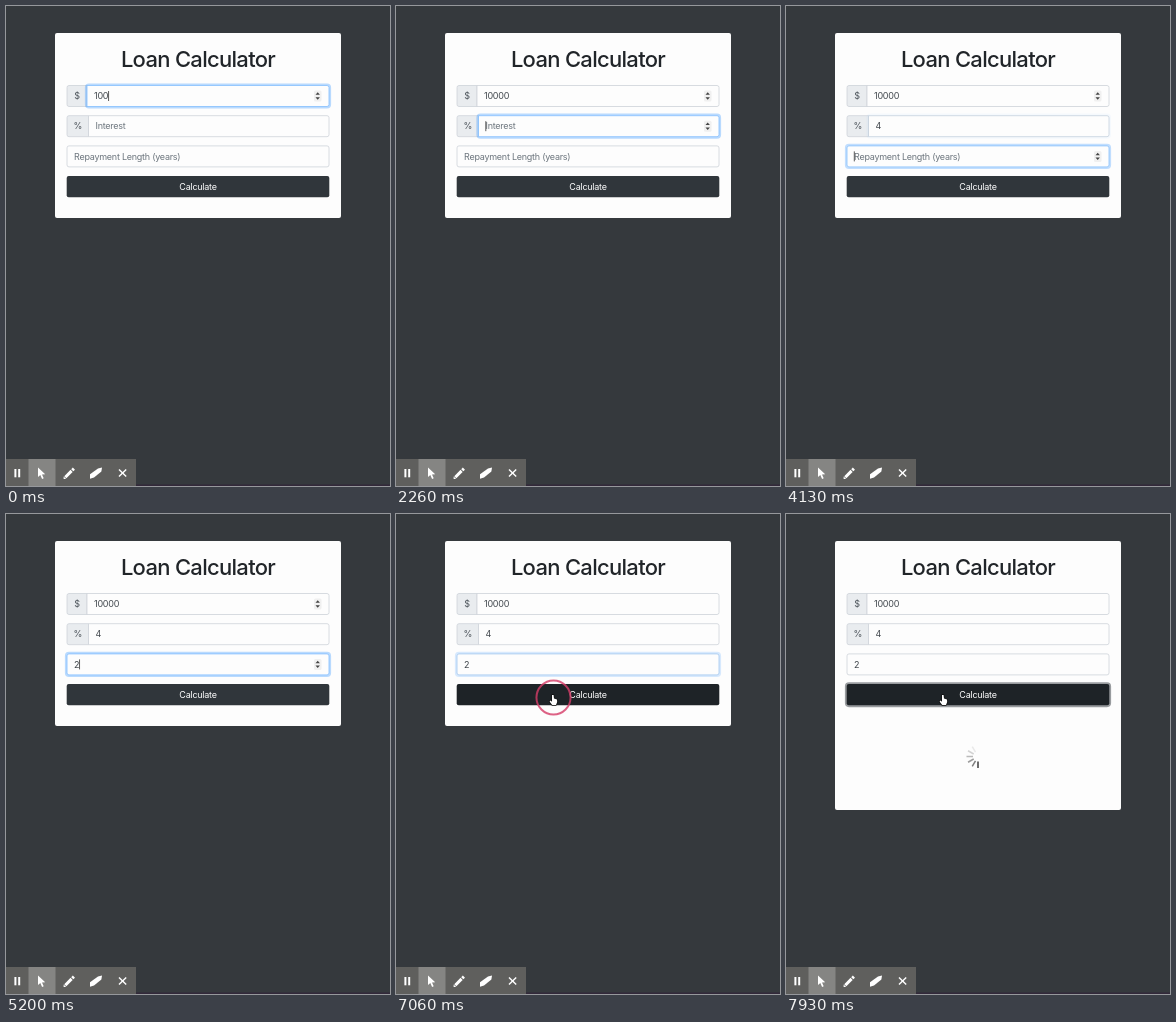
Write an HTML page with a canvas that moves like this. It is 384 px wide and 480 px high and loops after 8 s.

```html
<!DOCTYPE html>
<html lang="en">
<head>
<meta charset="utf-8">
<title>Loan Calculator</title>
<style>
  html, body { margin: 0; width: 100%; height: 100%; overflow: hidden; background: #35393d; }
  canvas { display: block; width: 384px; height: 480px; }
</style>
</head>
<body>
<canvas id="stage"></canvas>
<script>
const LOOP = 8000, STEP = 1000 / 15;
const canvas = document.getElementById('stage');
const ctx = canvas.getContext('2d');
const dpr = window.devicePixelRatio || 1;
canvas.width = 384 * dpr;
canvas.height = 480 * dpr;

// Each row: top edge, left edge of the input, focus period
const rows = [
  { y: 79.5, x: 81, sign: '$', hint: '', from: -1000, to: 1260,
    value: t => t < 460 ? '100' : t < 860 ? '1000' : '10000' },
  { y: 109.7, x: 82.5, sign: '%', hint: 'Interest', from: 1260, to: 4000,
    value: t => t < 3000 ? '' : '4' },
  { y: 139.9, x: 61, hint: 'Repayment Length (years)', from: 4000, to: 7000,
    value: t => t < 5200 ? '' : '2' }
];
const caretOff = [[1730, 2260], [2730, 3000], [3530, 4000], [4600, 5060], [5660, 6200], [6730, 7000]];
const cursorPath = [[6460, 160, 95], [6530, 159, 115], [6600, 158, 131.5], [6730, 157.5, 160], [6860, 157, 181]];
const ringPath = [[7000, 12], [7060, 18], [7130, 8], [7200, 0]];

const clamp = v => Math.max(0, Math.min(1, v));
const fade = (t, start, length = 150) => clamp((t - start) / length);

function along(path, t, k) {
  if (t <= path[0][0]) return path[0][k];
  for (let i = 1; i < path.length; i++) {
    const a = path[i - 1], b = path[i];
    if (t <= b[0]) return a[k] + (b[k] - a[k]) * (t - a[0]) / (b[0] - a[0]);
  }
  return path[path.length - 1][k];
}

function mix(a, b, p) {
  return `rgb(${a.map((v, i) => Math.round(v + (b[i] - v) * p))})`;
}

function box(x, y, w, h, radius, fill, stroke, width = 0.8) {
  ctx.beginPath();
  ctx.roundRect(x, y, w, h, radius);
  if (fill) { ctx.fillStyle = fill; ctx.fill(); }
  if (stroke) { ctx.strokeStyle = stroke; ctx.lineWidth = width; ctx.stroke(); }
}

function text(string, x, y, color, size = 9, weight = 400, align = 'left', spacing = -0.25) {
  ctx.font = `${weight} ${size}px Inter, Roboto, sans-serif`;
  ctx.letterSpacing = spacing + 'px';
  ctx.textAlign = align;
  ctx.fillStyle = color;
  ctx.fillText(string, x, y);
  return ctx.measureText(string).width;
}

function polygon(points, fill, stroke) {
  ctx.beginPath();
  for (let i = 0; i < points.length; i += 2) ctx.lineTo(points[i], points[i + 1]);
  ctx.closePath();
  if (stroke) { ctx.strokeStyle = stroke; ctx.lineWidth = 1.4; ctx.lineJoin = 'round'; ctx.stroke(); }
  ctx.fillStyle = fill;
  ctx.fill();
}

function line(x1, y1, x2, y2, color, width) {
  ctx.beginPath();
  ctx.moveTo(x1, y1);
  ctx.lineTo(x2, y2);
  ctx.strokeStyle = color;
  ctx.lineWidth = width;
  ctx.stroke();
}

function stepper(y) {
  box(308, y - 5.5, 7.5, 11, 1.5, '#f0f0f0');
  polygon([309.5, y - 1.2, 311.7, y - 3.7, 313.9, y - 1.2], '#444');
  polygon([309.5, y + 1.2, 311.7, y + 3.7, 313.9, y + 1.2], '#444');
}

function drawRow(row, index, t) {
  const { x, y, sign, hint, from, to } = row;
  const focused = t >= from && t < to;
  const glow = fade(t, from) * (1 - fade(t, to));
  const width = 323 - x, middle = y + 10.5, baseline = middle + 3.2;

  if (sign) {
    box(61, y, x - 61, 21, [2, 0, 0, 2], '#e9ecef', '#ced4da');
    text(sign, (61 + x) / 2, baseline, '#495057', 9, 400, 'center');
  }
  if (glow > 0) box(x - 1, y - 1, width + 2, 23, 3, null, `rgba(0,123,255,${0.27 * glow})`, 2.2);
  box(x, y, width, 21, sign ? [0, 2, 2, 0] : 2, '#fdfdfd', mix([206, 212, 218], [128, 189, 255], glow));

  const value = row.value(t), left = x + 7;
  text(value || hint, left, baseline, value ? '#41474d' : '#6c757d');
  if (focused && !caretOff.some(([a, b]) => t >= a && t < b)) {
    const end = value ? left + ctx.measureText(value).width + 0.3 : left + 0.3;
    line(end, middle - 5, end, middle + 5, '#333', 0.8);
  }
  if (focused || (index === 0 && t < 6530)) stepper(middle);
}

function drawButton(t) {
  const ring = fade(t, 7070, 60);
  if (ring > 0) box(60, 169.3, 264, 22.8, 3, null, `rgba(52,58,64,${0.5 * ring})`, 2.2);
  box(60.7, 170, 262.6, 21.3, 2, mix([48, 54, 59], [30, 35, 39], fade(t, 6790)));
  text('Calculate', 192, 183.8, '#fff', 9, 400, 'center');
}

function drawLoader(t) {
  const head = Math.floor((t - 7130 + 4) / (2 * STEP));
  [1, 0.65, 0.5, 0.35, 0.22, 0.1].forEach((alpha, i) => {
    const angle = -Math.PI / 2 + (i - head) * Math.PI / 6;
    const c = Math.cos(angle), s = Math.sin(angle);
    line(192 + 5 * c, 242.5 + 5 * s, 192 + 11.5 * c, 242.5 + 11.5 * s, `rgba(60,60,60,${alpha})`, 1.5);
  });
}

function drawCursor(t) {
  if (t < 6460) return;
  const x = along(cursorPath, t, 1), y = along(cursorPath, t, 2);
  ctx.save();
  ctx.translate(x, y);
  const overField = rows.some(row => y > row.y && y < row.y + 21);
  if (y > 170) {
    polygon([-1, 0, 0.6, 0, 1, 3.6, 4, 4.6, 4.2, 7, 3, 10, -0.8, 10, -3.4, 6.6, -2.6, 5.6, -1, 6.8], '#fff', '#111');
  } else if (overField) {
    line(0, -4, 0, 4, '#333', 0.8);
    line(-1.5, -4.3, 1.5, -4.3, '#333', 0.7);
    line(-1.5, 4.3, 1.5, 4.3, '#333', 0.7);
  } else {
    polygon([0, 0, 0, 6.5, 1.4, 5.2, 2.4, 7.4, 3.3, 7, 2.4, 4.9, 4.3, 4.7], '#111', '#fff');
  }
  ctx.restore();
}

function drawClickRing(t) {
  if (t < 7000 || t >= 7200) return;
  ctx.beginPath();
  ctx.arc(157.5, 183.5, along(ringPath, t, 1), 0, 2 * Math.PI);
  ctx.strokeStyle = t < 7130 ? 'rgba(214,60,104,.8)' : 'rgba(190,30,85,.55)';
  ctx.lineWidth = 2;
  ctx.stroke();
}

function drawToolbar() {
  ctx.fillStyle = '#33293a';
  ctx.fillRect(130, 478.5, 254, 1.5);
  ctx.fillStyle = '#5f5f5d';
  ctx.fillRect(0, 453, 130, 27);
  ctx.fillStyle = '#858583';
  ctx.fillRect(22.5, 453, 27, 27);

  line(9.4, 463, 9.4, 471.3, '#fff', 2);
  line(13.2, 463, 13.2, 471.3, '#fff', 2);
  polygon([32, 461.5, 32, 471, 34.3, 469, 36.1, 473, 37.7, 472.3, 36, 468.4, 39.2, 468.2], '#fff');
  line(59.3, 471.2, 65.6, 464.9, '#fff', 3);
  polygon([57.6, 473, 57.6, 470.6, 60.2, 473], '#fff');
  line(66.3, 464.2, 67.9, 462.6, '#fff', 3);
  polygon([84, 468.3, 92, 462.4, 96, 461.5, 95.4, 465.5, 88, 471.5, 84, 472.8], '#fff');
  line(113, 463.4, 120.2, 470.6, '#fff', 1.4);
  line(120.2, 463.4, 113, 470.6, '#fff', 1.4);
}

function draw(now) {
  // Motion advances at 15 steps per second
  const t = Math.floor((now % LOOP + 7) / STEP) * STEP;
  const loading = t >= 7130;
  ctx.setTransform(dpr, 0, 0, dpr, 0, 0);
  ctx.fillStyle = '#35393d';
  ctx.fillRect(0, 0, 384, 480);
  box(49, 27, 286, loading ? 269 : 185, 2, '#fdfdfd');
  text('Loan Calculator', 192, 60.5, '#212529', 22, 500, 'center', -0.7);
  rows.forEach((row, i) => drawRow(row, i, t));
  drawButton(t);
  if (loading) drawLoader(t);
  drawClickRing(t);
  drawCursor(t);
  drawToolbar();
}

const start = performance.now();
function frame() {
  draw(performance.now() - start);
  requestAnimationFrame(frame);
}
frame();
</script>
</body>
</html>
```
